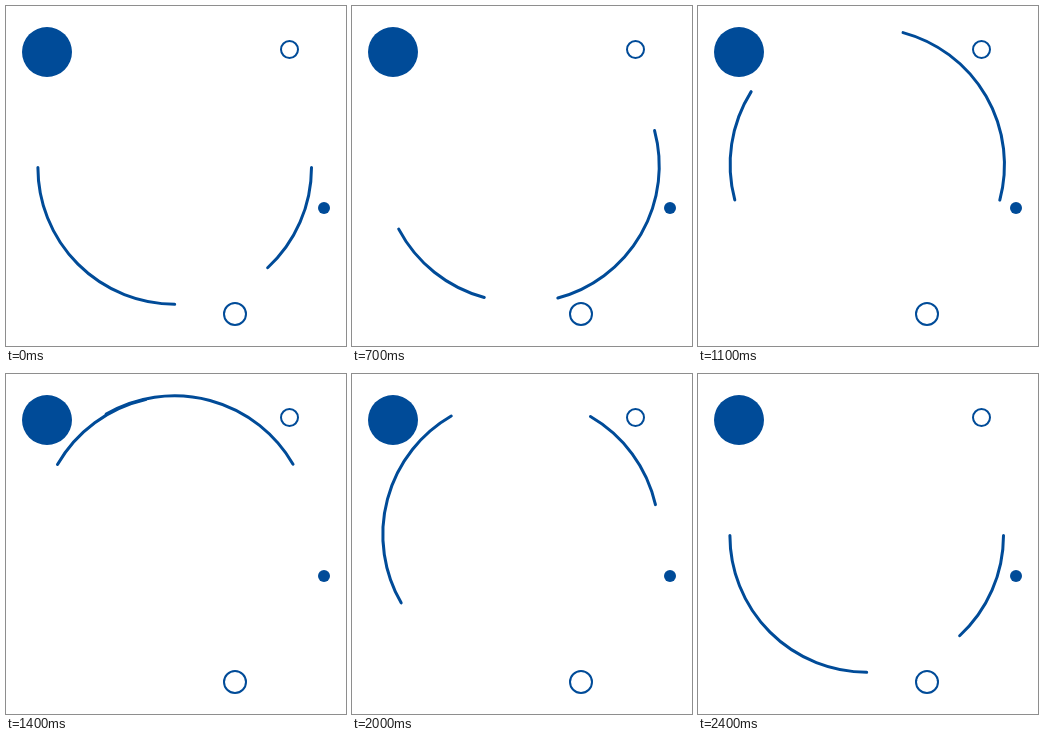
An HTML page that plays this animation: 340x340 px, repeating every 2500 ms.

```html
<!DOCTYPE html>
<html lang="en">
<head>
<meta charset="utf-8">
<title>Rotating arcs</title>
<style>
  html, body { margin: 0; width: 100%; height: 100%; overflow: hidden; background: #fff; }
  svg { display: block; width: 340px; height: 340px; }
</style>
</head>
<body>
<svg viewBox="0 0 340 340" fill="none" stroke="#004b98" stroke-width="2">
  <g fill="#004b98" stroke="none">
    <circle cx="41" cy="46" r="25"/>
    <circle cx="318" cy="202" r="6"/>
  </g>
  <circle cx="283.5" cy="43.5" r="8.5"/>
  <circle cx="229" cy="308" r="11"/>
  <g stroke-width="3" stroke-linecap="round">
    <path id="long"/>
    <path id="short"/>
  </g>
</svg>
<script>
  const STEP_MS = 100, STEPS = 25, STEP_DEG = 15;
  const PIVOT = "169 160";
  // The arcs' centre sits slightly off the pivot, so they wobble as they turn.
  const CX = 168.7, CY = 161.4, R = 136.8;
  const long = document.getElementById("long");
  const short = document.getElementById("short");

  function point(deg) {
    const a = deg * Math.PI / 180;
    return `${CX + R * Math.cos(a)} ${CY + R * Math.sin(a)}`;
  }

  function arc(from, to) {
    return `M${point(from)}A${R} ${R} 0 0 1 ${point(to)}`;
  }

  function turn(path, deg) {
    path.setAttribute("transform", `rotate(${deg} ${PIVOT})`);
  }

  long.setAttribute("d", arc(90, 180));
  short.setAttribute("d", arc(0, 47.2));

  const start = performance.now();
  function draw() {
    const elapsed = Math.max(0, performance.now() - start);
    const angle = Math.floor(elapsed / STEP_MS) % STEPS * STEP_DEG;
    turn(long, -angle);
    turn(short, angle);
    requestAnimationFrame(draw);
  }
  draw();
</script>
</body>
</html>
```
